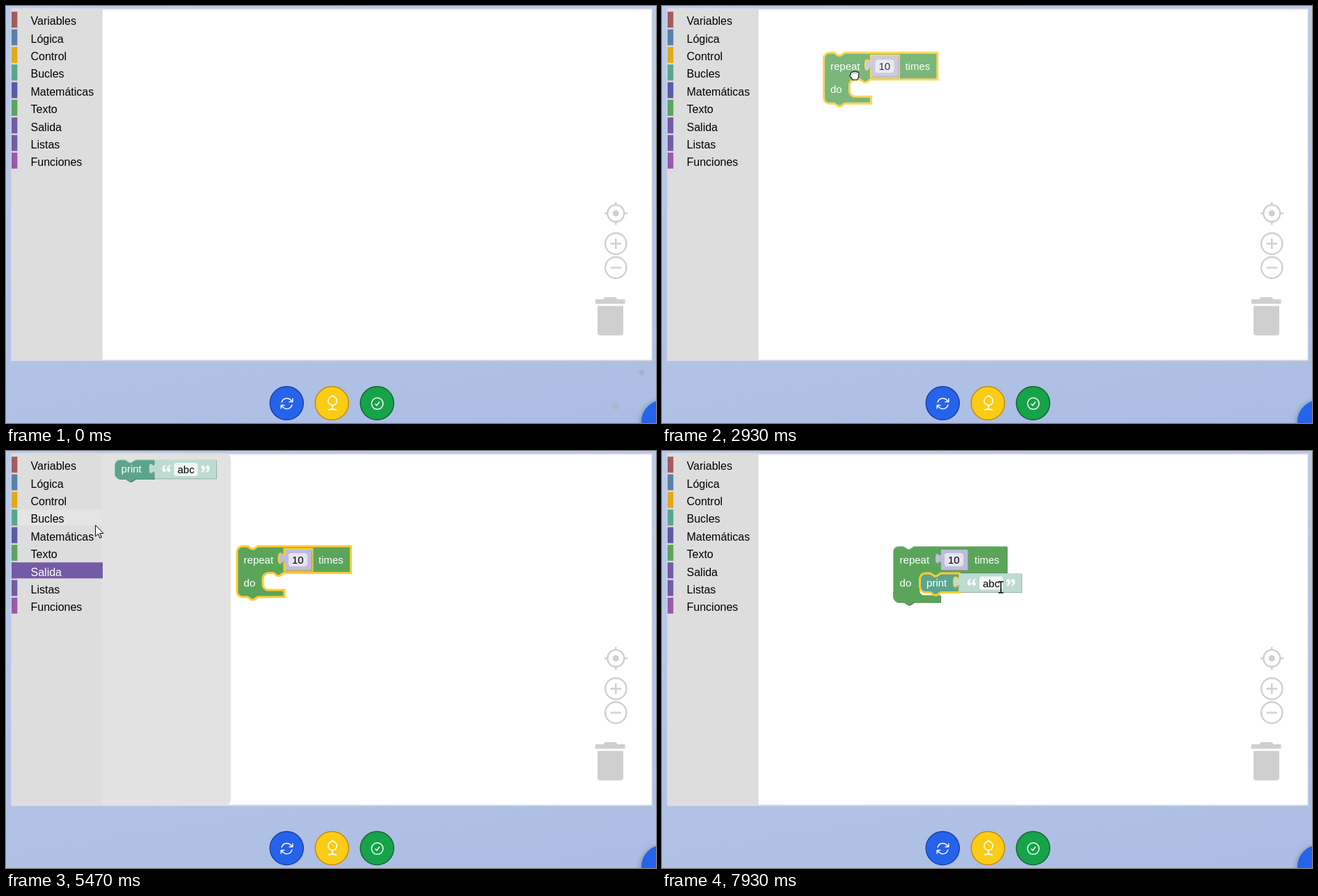
An HTML page that plays this animation: 934 by 600 pixels, repeating every 8000 ms.

```html
<!DOCTYPE html>
<html lang="es">
<head>
<meta charset="utf-8">
<title>Bloques</title>
<style>
html, body { margin: 0; width: 100%; height: 100%; overflow: hidden; }
body { background: linear-gradient(170deg, #bccbea, #b5c5e7 50%, #abbde3); }
svg { display: block; width: 934px; height: 600px; font: 15px "Liberation Sans", Arial, sans-serif; }
.menu { font-size: 16px; }
.label { fill: #fff; }
.light { fill: none; stroke: #fff; stroke-opacity: .3; }
.dark { filter: brightness(.8); }
.hole { fill: none; stroke: none; }
.sel > .edge, .sel > .hole { stroke: #fc3; stroke-width: 3; }
.sel > .light { display: none; }
.icon { fill: none; stroke: #fff; stroke-width: 1.6; stroke-linecap: round; stroke-linejoin: round; }
</style>
</head>
<body>
<svg id="stage" viewBox="0 0 934 600"></svg>
<script>
const GREEN = '#5ba55b', TEAL = '#5ba58c', LILAC = '#bdbddb', MINT = '#bddbd1';
const MENU = [
  ['Variables', '#a55b5b'], ['Lógica', '#5b80a5'], ['Control', '#e1a91a'],
  ['Bucles', TEAL], ['Matemáticas', '#5b5ba5'], ['Texto', GREEN],
  ['Salida', '#745ba5'], ['Listas', '#745ba5'], ['Funciones', '#995ba5']
];
const ROW = 25.35;

const SOCKET = 'c0 10-8-8-8 7.5s8-2.5 8 7.5';
const TAB = 'c0-10-8 8-8-7.5s8 2.5 8-7.5z';
const TOP = 'M0 8a8 8 0 0 1 8-8h7l6 4h3l6-4';
const FOOT = 'H30l-6 4h-3l-6-4H8a8 8 0 0 1-8-8z';

const group = (x, y, body, attr = '') => `<g transform="translate(${x} ${y})" ${attr}>${body}</g>`;
const rect = (x, y, w, h, fill, attr = '') =>
  `<rect x="${x}" y="${y}" width="${w}" height="${h}" fill="${fill}" ${attr}/>`;
const text = (x, y, s, cls = 'label') => `<text x="${x}" y="${y}" class="${cls}">${s}</text>`;
const circle = (x, y, r, fill, attr = '') => `<circle cx="${x}" cy="${y}" r="${r}" fill="${fill}" ${attr}/>`;

// Bevelled body: shadow, face, highlight
const shape = (d, color, w, h) =>
  `<path class="dark" d="${d}" fill="${color}" transform="translate(1 1)"/>
   <path class="edge" d="${d}" fill="${color}"/>
   <path class="light" d="M.5 ${h - 8}V8a7.5 7.5 0 0 1 7.5-7.5h7l6 4h3l6-4H${w}"/>`;

const field = (x, y, w, s, fill = '#fff9') => rect(x, y, w, 19, fill, 'rx="4"') + text(x + 5, y + 15, s, '');
const drop = (x, y, w, s) => field(x, y, w, s) +
  `<path d="M${x + w - 14} ${y + 8}h6l-3 4.5z" fill="${GREEN}"/>`;
const child = (x, y, w, h, color, body) => {
  const d = `M0 0H${w}V${h}H0V20${TAB}`;
  return group(x, y, `<path class="dark" d="${d}" fill="${color}" transform="translate(1 1)"/>
    <path d="${d}" fill="${color}"/>${body}`);
};
const number = (x, n) => {
  const w = n > 9 ? 38 : 30;
  return child(x, 5, w, 29, LILAC, field(5, 5, w - 11, n));
};

function loopPath(w, tall, extra = 0) {
  const row = tall ? 38.5 : 27.5, cave = row + 24.5 + extra;
  return `${TOP}H${w}${tall ? '' : 'V6' + SOCKET}V${row}H67l-6 4h-3l-6-4h-7a8 8 0 0 0-8 8` +
    `V${cave - 8}a8 8 0 0 0 8 8H${tall ? 68 : w}V${cave + 10}${FOOT}`;
}
const loop = (w, tall, body) =>
  shape(loopPath(w, tall), GREEN, w, tall ? 73 : 62) + body + text(9.6, tall ? 57.5 : 46, 'do');

const repeatBlock = loop(163.5, true,
  `<path class="hole" d="M68 4H108V35H68V25${TAB}"/>` +
  text(9.6, 24.5, 'repeat') + number(69, 10) + text(117, 24.5, 'times'));

const quote = (x, flip) => group(x, 13, `<g transform="rotate(${flip ? 180 : 0})">
  <path d="M-1-5.5c-4 1-5.300 3.600-5.300 6.500 0 2.300 1.300 3.700 3 3.700 1.600 0 2.700-1.200 2.700-2.700 0-1.600-1.200-2.600-2.500-2.600 0-1.700 1-3 2.500-3.700z
  m6.800 0c-4 1-5.300 3.600-5.300 6.500 0 2.300 1.300 3.700 3 3.700 1.600 0 2.700-1.200 2.700-2.700 0-1.600-1.200-2.600-2.500-2.600 0-1.700 1-3 2.500-3.700z" fill="#fff" opacity=".85"/></g>`);
const PRINT = `${TOP}H57V5${SOCKET}V27.5${FOOT}`;
const printBlock = shape(PRINT, TEAL, 57, 27.5) + text(9.6, 18.700, 'print') +
  child(57.5, 0, 88.5, 27, MINT, quote(17, false) + field(28, 4.500, 34, 'abc', '#fffc') + quote(73, true));

const loopsFlyout = rect(130, 4, 399.5, 506, '#e2e2e2', 'rx="8"') +
  group(156, 12.500, repeatBlock, 'id="pick1"') +
  group(156, 115, loop(131, false, text(9.6, 18.5, 'repeat') + drop(57, 4, 59.5, 'while'))) +
  group(156, 207, loop(125, false, text(9.6, 18.5, 'repeat') + drop(57, 4, 53.5, 'until'))) +
  group(156, 298, loop(354, true, text(9.6, 24.5, 'count with') + drop(81, 9.5, 30, 'i') +
    text(116.5, 24.5, 'from') + number(163, 1) + text(203, 24.5, 'to') + number(232.5, 10) +
    text(281, 24.5, 'by') + number(313.5, 1))) +
  group(156, 401, loop(188.5, false, text(9.6, 18.5, 'for each item') + drop(101, 4, 29.5, 'j') +
    text(135.5, 18.5, 'in list'))) +
  group(156, 492, shape(`${TOP}H154V27.5${FOOT}`, GREEN, 154, 27) + drop(5, 4, 87, 'break out') + text(98, 18.5, 'of loop'));
const printFlyout = rect(130, 4, 193, 506, '#e2e2e2', 'rx="8"') + group(156, 12.500, printBlock, 'id="pick2"');

const toolbox = rect(8, 4, 130.5, 506, '#ddd') + MENU.map(([name, color], i) => {
  const y = 8.2 + i * ROW;
  return rect(16, y, 123, 23, '#e4e4e4', 'class="hover"') + rect(8, y, 8.3, 23, color) +
    rect(8, y, 131, 23, color, 'class="open"') + text(35.5, y + 19.2, name, 'menu');
}).join('');

const controls = `<g fill="none" stroke="#d0d0d0" stroke-width="2.4">
  ${circle(876.3, 298.3, 12, 'none')}${circle(876.3, 298.3, 4.5, '#d0d0d0', 'stroke="none"')}
  <path d="M860 298.300h5m23 0h5M876.300 282v5m0 23v5"/>
  ${circle(876.3, 342, 15.2, 'none')}<path d="M868.500 342h15.600M876.300 334.200v15.600"/>
  ${circle(876.3, 376.5, 15.2, 'none')}<path d="M868.500 376.500h15.600"/></g>
  <path fill="#cfcfcf" d="M847 422h11l3-3h15l3 3h10.500v6.500H847zM850 431.500h37V470q0 4-4 4h-29q-4 0-4-4z"/>`;

const button = (x, fill, line, icon) =>
  circle(x, 571.5, 24, fill, `stroke="${line}" stroke-width="1.5"`) + `<path class="icon" ${icon}/>`;
const buttons =
  button(403.3, '#2563eb', '#1e40af', 'transform="translate(392.500 561) scale(.92)" d="M16 9.350h5M3 19.640v-5m0 0h5m-5 0 3.180 3.200a8.250 8.250 0 0 0 13.800-3.700M4 9.860a8.250 8.250 0 0 1 13.800-3.700L21 9.350m0-5v5"') +
  button(468.3, '#facc15', '#ca8a04', 'd="M469.200 560.500q1.500 1.500 3.400 2.300a6.300 6.300 0 1 1-6.800 0q1.900-.8 3.400-2.300zM469 575v5M463.500 581q5.500-1.800 11 0"') +
  button(533.2, '#16a34a', '#166534', 'transform="translate(522.500 561) scale(.92)" d="M9 12.750 11.250 15 15 9.750M21 12a9 9 0 1 1-18 0 9 9 0 0 1 18 0Z"') +
  circle(944, 598, 31, '#2563eb', 'style="filter:drop-shadow(0 2px 4px #0006)"');

const glove = (lines, palm) => ['#000', '#fff'].map((c, i) =>
  `<path d="${lines}" fill="none" stroke="${c}" stroke-width="${4.4 - 2 * i}" stroke-linecap="round"/>
   <path d="${palm}" fill="#fff" stroke="${c}" stroke-width="${2.4 - 2 * i}" stroke-linejoin="round"/>`).join('');
const cursors = {
  arrow: '<path d="M.5.5V16.600l3.800-3.600 2.500 5.900 2.300-1-2.500-5.700h5.200z" fill="#fff" stroke="#000"/>',
  hand: glove('M-3 2l-1.500-6M-.6 0l-.6-6.500M2 0l.5-6M4.600 2l1-4.500M-3 4.500l-3.800-4', 'M-3.500 1h9v3l-1.500 4h-5l-3-4z'),
  fist: glove('M-3.500-2v-1M-.8-3v-1M2-3v-1M4.600-2v-1M-3.500 1l-1.500 0', 'M-4.500-2h9.800v4l-1.500 4h-6l-2.300-4z'),
  beam: '<path d="M-3.500-8h2.500l1 1 1-1h2.500M-3.500 8h2.500l1-1 1 1h2.500M0-7v14" fill="none" stroke="#000" stroke-width="1.500"/>'
};

const stage = document.getElementById('stage');
stage.innerHTML = `<clipPath id="view"><rect x="138.500" y="4" width="789" height="506"/></clipPath>` +
  rect(7, 3, 922, 508, '#d6d7dd') + rect(138.5, 5, 789, 504, '#fff') + controls +
  `<g id="ghost" opacity=".3">${circle(913.5, 527.5, 4, '#7b9aa8')}${circle(876, 576, 5, '#b0ab98')}</g>` +
  `<g clip-path="url(#view)">
    <g id="repeat">${repeatBlock}</g>
    <path id="marker" d="${PRINT}" opacity=".2" transform="translate(370.500 176)"/>
    <g id="print">${printBlock}</g>
    <g id="loops">${loopsFlyout}</g><g id="prints">${printFlyout}</g>
  </g>` + toolbox + buttons +
  `<g id="cursor">${Object.entries(cursors).map(([k, v]) => `<g id="${k}">${v}</g>`).join('')}</g>`;

const el = id => document.getElementById(id);
const hovers = stage.querySelectorAll('.hover'), opens = stage.querySelectorAll('.open');
const names = stage.querySelectorAll('.menu');
const repeatBodies = el('repeat').querySelectorAll(':scope > .dark, :scope > .edge');

// Keys: time, x, y
const POINTER = [
  [66, 918, 566], [600, 78, 52], [800, 47, 73], [1000, 47, 73], [1200, 58, 104], [1530, 58, 104],
  [1666, 65, 101], [1930, 65, 101], [2333, 204, 47], [2533, 194, 40], [2700, 194, 40],
  [3200, 374, 170], [3333, 374, 170], [3400, 370, 165], [3533, 370, 165], [4066, 62, 150], [4400, 62, 150],
  [4533, 65, 161], [4666, 65, 161], [4800, 70, 179], [5066, 70, 179], [5866, 186, 34],
  [6066, 203, 77], [6600, 419, 198], [6733, 414, 204], [6800, 408, 208], [7000, 408, 208],
  [7250, 416, 217], [7530, 468, 170], [7800, 489, 193], [7933, 487, 196]
];
const REPEAT = [[2733, 160, 15], [3200, 336, 142], [3400, 336, 142], [3466, 332, 137]];
const PRINT_AT = [
  [5933, 156, 12.5], [6066, 160, 24.5], [6200, 198, 66], [6600, 389, 178], [6733, 384, 184],
  [6800, 378, 188], [7065, 378, 188], [7066, 370.5, 176]
];

function track(keys, t) {
  let i = keys.findIndex(k => k[0] > t);
  if (i < 0) i = keys.length;
  const a = keys[Math.max(i - 1, 0)], b = keys[Math.min(i, keys.length - 1)];
  if (a === b) return [a[1], a[2]];
  const u = (t - a[0]) / (b[0] - a[0]);
  const e = (u + u * u * (3 - 2 * u)) / 2;
  return [a[1] + (b[1] - a[1]) * e, a[2] + (b[2] - a[2]) * e];
}
const show = (node, on) => node.style.display = on ? '' : 'none';
const place = (id, [x, y]) => el(id).setAttribute('transform', `translate(${x.toFixed(1)} ${y.toFixed(1)})`);
const select = (id, on) => el(id).classList.toggle('sel', on);

function draw(t) {
  const within = (a, b) => t >= a && t < b;
  const openRow = within(1733, 2733) ? 3 : within(5066, 5933) ? 6 : -1;
  const [x, y] = track(POINTER, t);
  const drag1 = within(2733, 3466), drag2 = within(5933, 7066);

  show(el('ghost'), t < 66);
  show(el('loops'), openRow === 3);
  show(el('prints'), openRow === 6);
  select('pick1', t >= 2266);
  select('pick2', t >= 5666);

  show(el('repeat'), t >= 2733);
  place('repeat', track(REPEAT, t));
  select('repeat', t < 5666);
  el('repeat').style.opacity = drag1 ? .8 : 1;
  const d = loopPath(163.5, true, t >= 6533 ? 7.5 : 0);
  repeatBodies.forEach(p => p.setAttribute('d', d));

  show(el('marker'), within(6533, 7066));
  show(el('print'), t >= 5933);
  place('print', track(PRINT_AT, t));
  select('print', true);
  el('print').style.opacity = drag2 ? .8 : 1;

  const hoverRow = t >= 66 && x < 139 ? Math.floor((y - 8) / ROW) : -1;
  MENU.forEach((m, i) => {
    show(hovers[i], i === hoverRow);
    show(opens[i], i === openRow);
    names[i].style.fill = i === openRow ? '#fff' : '#000';
  });

  const overFlyout = openRow >= 0 && (x < 156 || y > (openRow === 3 ? 88 : 44));
  const kind = x < 139 || overFlyout ? 'arrow'
    : within(2733, 3400) || drag2 ? 'fist'
    : t >= 7666 ? 'beam' : 'hand';
  show(el('cursor'), t >= 66);
  place('cursor', [x, y]);
  for (const k in cursors) show(el(k), k === kind);
}

const STEP = 1000 / 15, start = performance.now();
function tick() {
  const t = (performance.now() - start) % 8000;
  draw(Math.floor((t + 5) / STEP) % 120 * STEP);
  requestAnimationFrame(tick);
}
tick();
</script>
</body>
</html>
```
